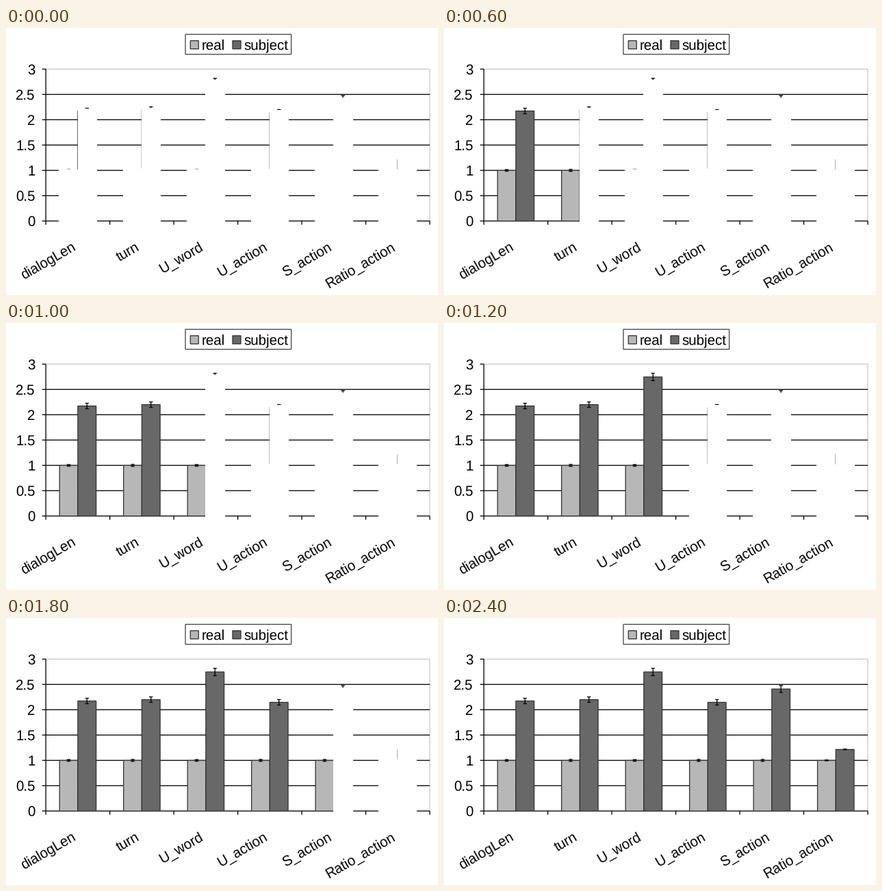
Write a matplotlib script that moves like this. It is 631 px wide and 391 px high and loops after 2.6 s.

```python
import matplotlib.pyplot as plt
from matplotlib.animation import FuncAnimation
from matplotlib.patches import Rectangle

W, H, DPI = 631, 391, 64
LEFT, RIGHT, TOP, BASE = 58.2, 619.0, 60.2, 282.6
LIGHT, DARK = "#b7b7b7", "#686868"
PT = 72 / DPI  # points per pixel
STROKE = 1.3
PITCH = (RIGHT - LEFT) / 6
BAR = PITCH / 3.5

# label, real error, subject bar top, subject error, cover tops (all in pixels)
GROUPS = [
    ("dialogLen", 1.2, 121.5, 4.0, 207, 118),
    ("turn", 1.4, 119.5, 4.0, 206, 117),
    ("U_word", 1.2, 79.0, 5.4, 207, 76),
    ("U_action", 1.4, 123.5, 4.0, 206, 120),
    ("S_action", 1.4, 104.0, 5.0, 206, 102),
    ("Ratio_action", 0.6, 192.5, 0.5, 207, 191),
]

plt.rcParams.update({"font.family": "Liberation Sans", "path.snap": False,
                     "text.hinting": "none"})
fig = plt.figure(figsize=(W / DPI, H / DPI), dpi=DPI, facecolor="white")
ax = fig.add_axes([0, 0, 1, 1])
ax.set(xlim=(0, W), ylim=(H, 0))
ax.axis("off")


def rect(x0, y0, x1, y1, fill, edge="none", z=1):
    patch = Rectangle((x0, y0), x1 - x0, y1 - y0, facecolor=fill,
                      edgecolor=edge, linewidth=STROKE * PT, zorder=z)
    return ax.add_patch(patch)


def line(x0, y0, x1, y1, color="black", z=1):
    ax.plot([x0, x1], [y0, y1], color=color, lw=STROKE * PT, zorder=z,
            solid_capstyle="butt")


def text(x, y, s, **kw):
    ax.text(x, y, s, fontsize=20.5 * PT, va="baseline", **kw)


def draw_frame():
    line(LEFT, TOP, RIGHT, TOP, "#c8c8c8")
    line(RIGHT, TOP, RIGHT, BASE, "#c8c8c8")
    for i in range(7):
        y = BASE - i * (BASE - TOP) / 6
        if i < 6:
            line(LEFT, y, RIGHT, y)
        line(LEFT - 5.5, y, LEFT, y)
        text(42.5, y + 7.3, f"{i / 2:g}", ha="right")
        x = LEFT + i * PITCH
        line(x, BASE, x, BASE + 5.5)
    line(LEFT, TOP, LEFT, BASE)


def draw_legend():
    rect(262, 9.3, 416.6, 38.5, "white", "#444444")
    for x, color, name in ((269.3, LIGHT, "real"), (331, DARK, "subject")):
        rect(x, 18.6, x + 12, 30.6, color, "#333333")
        text(x + 16.7, 31.6, name)


def draw_bar(x, top, error, color):
    rect(x, top, x + BAR, BASE, color, "#333333", z=2)
    mid = x + BAR / 2
    line(mid, top - error, mid, top + error, z=3)
    for y in (top - error, top + error):
        line(mid - 2.7, y, mid + 2.7, y, z=3)


draw_frame()
draw_legend()
covers = []
for i, (name, real_err, top, err, *cover_tops) in enumerate(GROUPS):
    x = LEFT + i * PITCH + 0.75 * BAR
    draw_bar(x, 208.5, real_err, LIGHT)
    draw_bar(x + BAR, top, err, DARK)
    text(x + BAR - 2, 324, name, ha="right", rotation=30,
         rotation_mode="anchor")
    edges = [int(x - 0.6), int(x + BAR + 0.1), int(x + 2 * BAR + 1.7)]
    for x0, x1, cover_top in zip(edges, edges[1:], cover_tops):
        covers.append(rect(x0, cover_top, x1, 284, "white", z=4))


def update(frame):
    for k, cover in enumerate(covers):
        cover.set_visible(k >= frame)
    return covers


# The opening state plus one more uncovered bar per step.
anim = FuncAnimation(fig, update, frames=len(covers) + 1, interval=200,
                     repeat=True, repeat_delay=0, blit=False)
plt.show()
```
